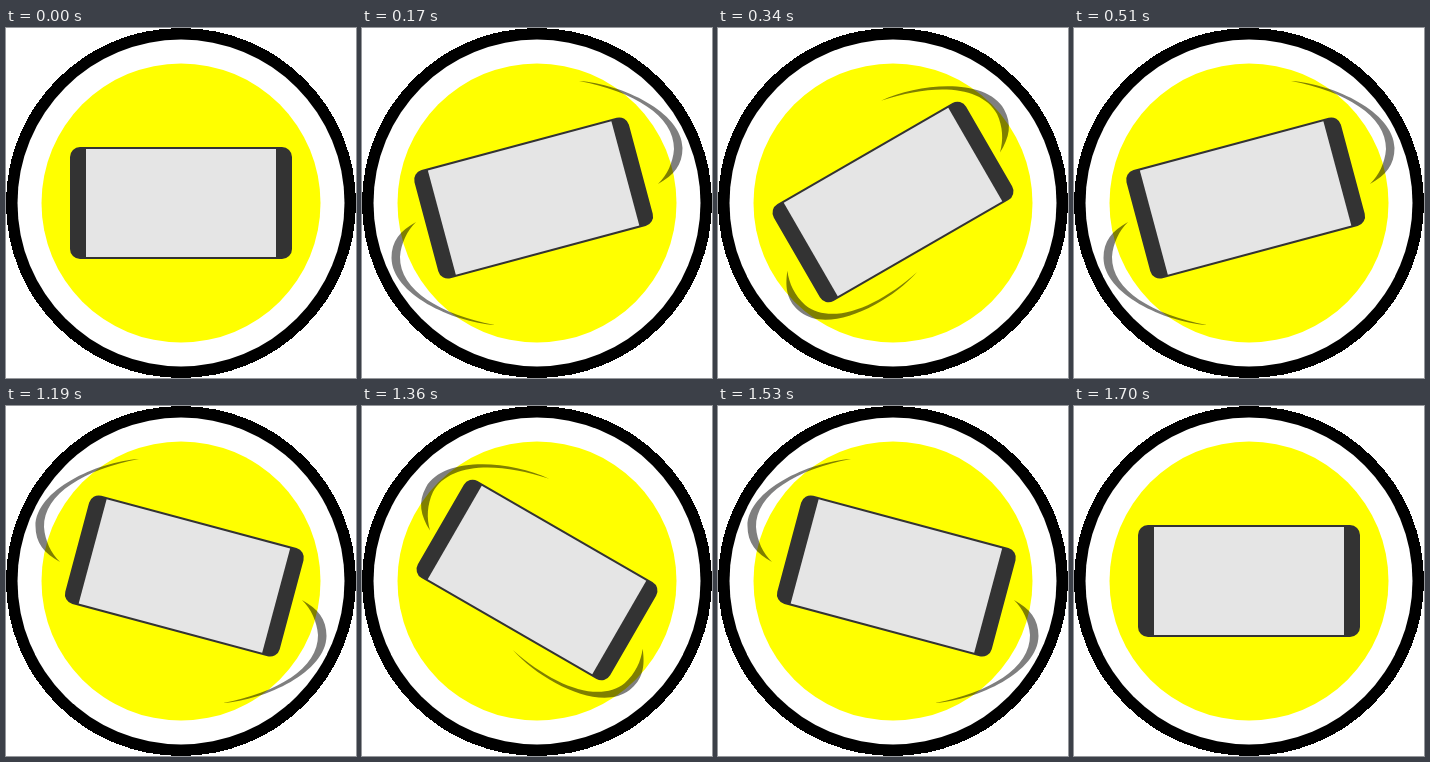
Animation, 350 px wide and 350 px high, one loop 2720 ms. Source, as an HTML page:

```html
<!DOCTYPE html>
<html lang="en">
<head>
<meta charset="utf-8">
<title>Shake the phone</title>
<style>
html, body { margin: 0; width: 100%; height: 100%; overflow: hidden; background: #fff; }
svg { display: block; width: 100vw; height: 100vh; }
</style>
</head>
<body>
<svg viewBox="0 0 350 350">
  <defs>
    <path id="swoosh" d="M39.5-51.5C-3.5-48.5-63.5-20.5-64 15.5C-64 32.5-55.5 42.5-39.5 51.5C-48.5 42.5-54.5 30.5-55.5 16.5C-56-16.5-14.5-41.5 39.5-51.5Z"/>
  </defs>
  <circle cx="175" cy="175" r="175" shape-rendering="crispEdges"/>
  <circle cx="175" cy="175" r="163.5" fill="#fff"/>
  <circle cx="175" cy="175" r="139.5" fill="#ff0"/>
  <g id="scene">
    <g id="half" fill-opacity=".5">
      <use href="#swoosh" transform="translate(93.5 104.5)"/>
      <use href="#swoosh" transform="translate(256.5 245.5) rotate(180)"/>
    </g>
    <g id="full" fill-opacity=".5">
      <use href="#swoosh" transform="translate(127.5 98.6) rotate(29)"/>
      <use href="#swoosh" transform="translate(215.7 243.4) rotate(232)"/>
    </g>
    <g id="phone">
      <rect x="-111" y="-56" width="222" height="112" rx="10" fill="#333"/>
      <rect x="-95" y="-54" width="190" height="108" fill="#e5e5e5"/>
    </g>
  </g>
</svg>
<script>
const STEP = 170, LOOP = 2720;
const tilts = [0, -15, -30, -15, 0, 0, 0, 15, 30, 15];
const centers = { 0: '175 175', 15: '178.4 170', 30: '175 174' };
const [scene, half, full, phone] =
  ['scene', 'half', 'full', 'phone'].map(id => document.getElementById(id));

const show = (el, on) => el.setAttribute('visibility', on ? 'visible' : 'hidden');

function draw() {
  const tilt = tilts[Math.floor(performance.now() % LOOP / STEP)] || 0;
  const angle = Math.abs(tilt);
  // Left tilts mirror the right ones.
  scene.setAttribute('transform', tilt < 0 ? 'matrix(-1 0 0 1 350 0)' : '');
  phone.setAttribute('transform', `translate(${centers[angle]}) rotate(${angle})`);
  show(half, angle === 15);
  show(full, angle === 30);
  requestAnimationFrame(draw);
}
draw();
</script>
</body>
</html>
```
